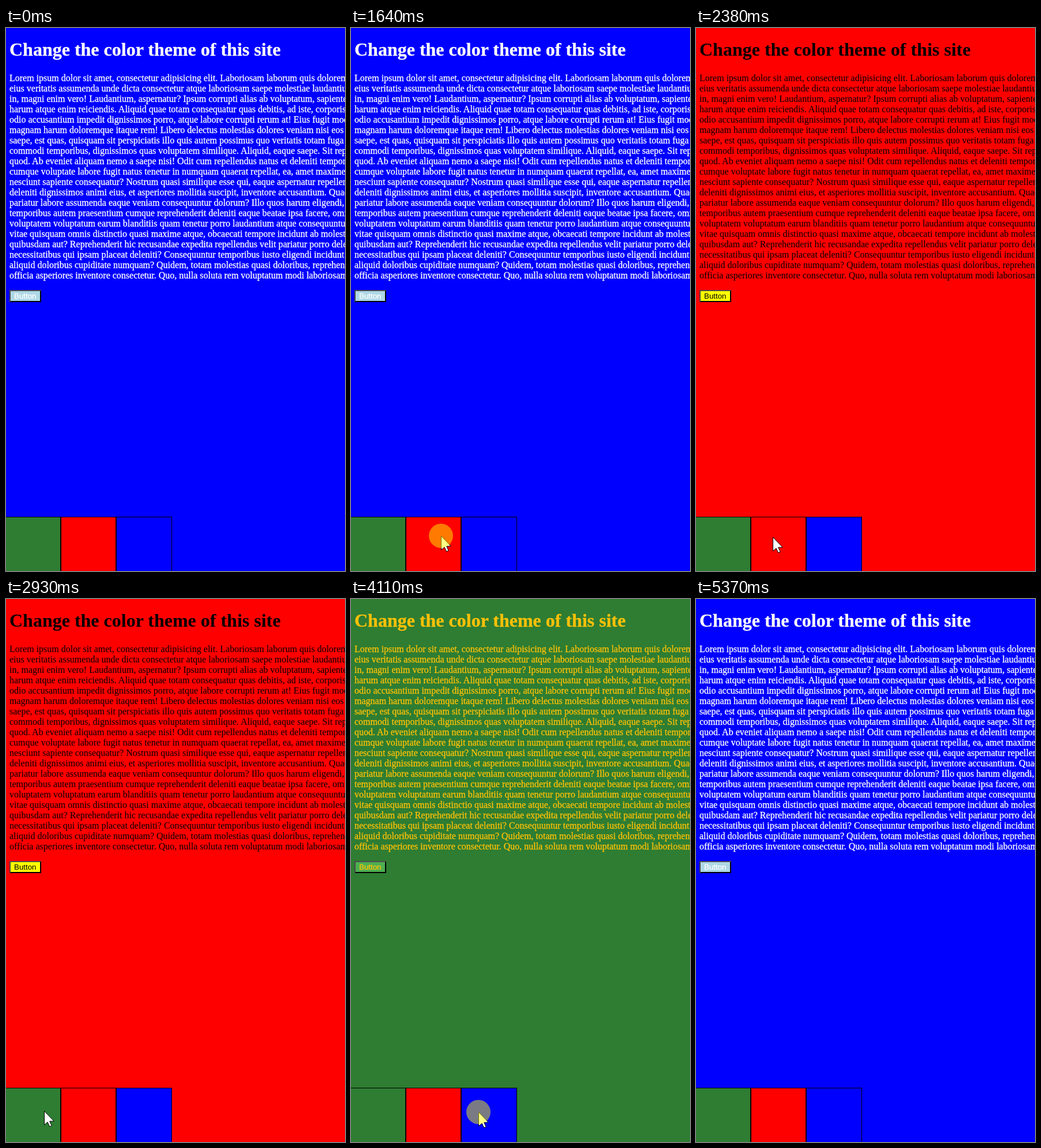
These frames come from a looping animation (588x941 px, 5.97 s). An HTML page:

```html
<!DOCTYPE html>
<html lang="en">
<head>
<meta charset="utf-8">
<title>Color theme switcher</title>
<style>
  html, body { margin: 0; width: 100%; height: 100%; overflow: hidden; }
  svg { display: block; width: 588px; height: 941px; }
  text { white-space: pre; }
  .serif { font: 16px "Liberation Serif", "Times New Roman", serif; }
  .title { font-size: 32px; font-weight: bold; }
  .sans { font: 13.333px "Liberation Sans", Arial, sans-serif; }
</style>
</head>
<body>
<svg viewBox="0 0 588 941">
  <rect id="page" width="588" height="941"/>
  <g id="copy" class="serif">
    <text class="title" x="6" y="48">Change the color theme of this site</text>
  </g>
  <g shape-rendering="crispEdges">
    <path d="M6 454H61V475H6Z"/>
    <path d="M6 454H61L59 456H8V473L6 475Z" fill="#4c4c4c"/>
    <path id="button" d="M8 456H59V473H8Z"/>
  </g>
  <text id="label" class="sans" x="14" y="469">Button</text>
  <g id="swatches" shape-rendering="crispEdges"></g>
  <g id="pointer">
    <path d="M.5 .5V24.5L6 19.5L9.7 27.3L13.2 25.7L9.7 18H17.3Z" fill="#fff" stroke="#000"/>
    <circle id="press" r="21" fill="#ff0" fill-opacity=".48"/>
  </g>
</svg>
<script>
const LOOP = 5970, STEP = 70;

// Light text on a dark page is drawn slightly heavier.
const themes = {
  blue:  { page: '#0000ff', text: '#ffffff', button: '#add8e6', weight: .3 },
  red:   { page: '#ff0000', text: '#000000', button: '#ffff00', weight: 0 },
  green: { page: '#2e7d32', text: '#ffc107', button: '#4caf50', weight: .3 }
};

const lines = [
  'Lorem ipsum dolor sit amet, consectetur adipisicing elit. Laboriosam laborum quis dolorem',
  'eius veritatis assumenda unde dicta consectetur atque laboriosam saepe molestiae laudantium',
  'in, magni enim vero! Laudantium, aspernatur? Ipsum corrupti alias ab voluptatum, sapiente',
  'harum atque enim reiciendis. Aliquid quae totam consequatur quas debitis, ad iste, corporis',
  'odio accusantium impedit dignissimos porro, atque labore corrupti rerum at! Eius fugit modi',
  'magnam harum doloremque itaque rem! Libero delectus molestias dolores veniam nisi eos',
  'saepe, est quas, quisquam sit perspiciatis illo quis autem possimus quo veritatis totam fuga',
  'commodi temporibus, dignissimos quas voluptatem similique. Aliquid, eaque saepe. Sit repellat',
  'quod. Ab eveniet aliquam nemo a saepe nisi! Odit cum repellendus natus et deleniti tempore',
  'cumque voluptate labore fugit natus tenetur in numquam quaerat repellat, ea, amet maxime',
  'nesciunt sapiente consequatur? Nostrum quasi similique esse qui, eaque aspernatur repellendus',
  'deleniti dignissimos animi eius, et asperiores mollitia suscipit, inventore accusantium. Quaerat',
  'pariatur labore assumenda eaque veniam consequuntur dolorum? Illo quos harum eligendi,',
  'temporibus autem praesentium cumque reprehenderit deleniti eaque beatae ipsa facere, omnis',
  'voluptatem voluptatum earum blanditiis quam tenetur porro laudantium atque consequuntur',
  'vitae quisquam omnis distinctio quasi maxime atque, obcaecati tempore incidunt ab molestiae',
  'quibusdam aut? Reprehenderit hic recusandae expedita repellendus velit pariatur porro deleniti',
  'necessitatibus qui ipsam placeat deleniti? Consequuntur temporibus iusto eligendi incidunt',
  'aliquid doloribus cupiditate numquam? Quidem, totam molestias quasi doloribus, reprehenderit',
  'officia asperiores inventore consectetur. Quo, nulla soluta rem voluptatum modi laboriosam'
];

const easeOut = u => 1 - (1 - u) ** 2.4;
const easeInOut = u => u * u * (3 - 2 * u);
const easeIn = u => u * u;

// Each move starts and ends at a rest point of the pointer.
const moves = [
  { start: 880,  end: 1510, from: [510, 714], to: [156, 880], ease: easeOut },
  { start: 2170, end: 2800, from: [156, 880], to: [66, 887],  ease: easeInOut },
  { start: 3410, end: 4040, from: [66, 887],  to: [221, 889], ease: easeInOut },
  { start: 5160, end: 5300, from: [221, 889], to: [441, 802], ease: easeIn }
];
const presses = [[1640, 1780], [2800, 2930], [4110, 4310]];
const themeChanges = [[0, 'blue'], [1710, 'red'], [3000, 'green'], [4310, 'blue']];
const exitTime = 5370;

const byId = id => document.getElementById(id);

function setAttrs(node, attrs) {
  for (const key in attrs) node.setAttribute(key, attrs[key]);
}

function addNode(parent, tag, attrs, content = '') {
  const node = document.createElementNS('http://www.w3.org/2000/svg', tag);
  setAttrs(node, attrs);
  node.textContent = content;
  parent.append(node);
}

lines.forEach((line, i) => addNode(byId('copy'), 'text', { x: 6, y: 92 + 18 * i }, line));

[['green', -2, 95], ['red', 95, 191], ['blue', 191, 288]].forEach(([name, left, right]) => {
  addNode(byId('swatches'), 'rect', {
    x: left + .5, y: 847.5, width: right - left - 1, height: 96,
    fill: themes[name].page, stroke: '#000'
  });
});

function pointerAt(t) {
  const { start, end, from, to, ease } = moves.findLast(m => t >= m.start);
  const elapsed = Math.floor((t - start) / STEP) * STEP;
  const u = ease(Math.min(1, elapsed / (end - start)));
  return from.map((v, i) => Math.round(v + (to[i] - v) * u));
}

function draw(t) {
  const { page, text, button, weight } = themes[themeChanges.findLast(([at]) => t >= at)[1]];
  const ink = { fill: text, stroke: text, 'stroke-width': weight };
  setAttrs(byId('page'), { fill: page });
  setAttrs(byId('copy'), ink);
  setAttrs(byId('label'), ink);
  setAttrs(byId('button'), { fill: button });

  const shown = t >= moves[0].start && t < exitTime;
  setAttrs(byId('pointer'), { display: shown ? 'inline' : 'none' });
  if (!shown) return;
  const pressed = presses.some(([on, off]) => t >= on && t < off);
  setAttrs(byId('pointer'), { transform: `translate(${pointerAt(t)})` });
  setAttrs(byId('press'), { display: pressed ? 'inline' : 'none' });
}

const began = performance.now();
function tick() {
  draw((performance.now() - began) % LOOP);
  requestAnimationFrame(tick);
}
tick();
</script>
</body>
</html>
```
